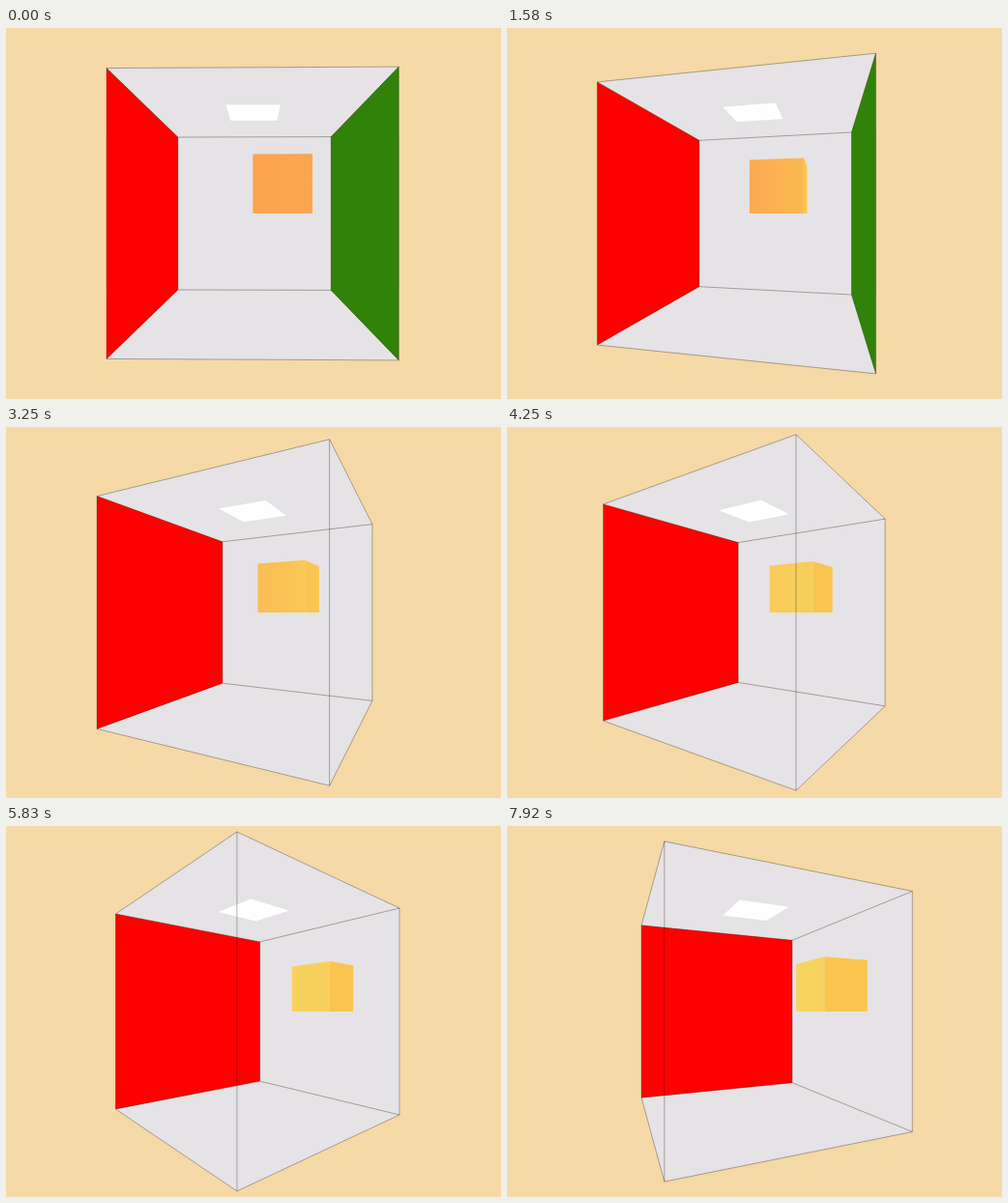
An HTML page with a canvas for the animation above (8 s loop, 512 px wide and 384 px high).

```html
<!DOCTYPE html>
<html lang="en">
<head>
<meta charset="utf-8">
<title>Rotating room</title>
<style>
  html, body { margin: 0; width: 100%; height: 100%; overflow: hidden; background: #f5d9a6; }
  canvas { display: block; width: 100vw; height: 100vh; object-fit: contain; }
</style>
</head>
<body>
<canvas id="stage" width="512" height="384"></canvas>
<script>
const ctx = document.getElementById('stage').getContext('2d');
const LOOP = 8000, FPS = 12;
const DISTANCE = 3.2;                          // camera to room centre, in half room sizes
const FOCAL = 192 / Math.tan(Math.PI / 6);     // 60 degree field of view
const CUBE = 0.5;
const WALL = '#e5e3e6', LINE = 'rgba(0,0,0,.3)';

// seconds, room angle in degrees, green at the left and right of the cube front, its blue
const STEPS = [
  [0,    0.6,  163, 165, 80],
  [0.92, 7,    166, 178, 80],
  [2.25, 18.35, 175, 194, 80],
  [4.25, 35.5, 203, 206, 90],
  [5.83, 48.7, 208, 207, 93],
  [7.08, 59.6, 210, 209, 94],
  [7.92, 67,   211, 210, 95]
];

function stateAt(t) {
  let i = 1;
  while (i < STEPS.length - 1 && t > STEPS[i][0]) i++;
  const a = STEPS[i - 1], b = STEPS[i];
  const p = Math.min(1, (t - a[0]) / (b[0] - a[0]));
  return a.map((v, k) => v + (b[k] - v) * p);
}

// The cube glides to the back, then returns at the same speed.
const cubeFront = t => -0.7155 + 0.1835 * Math.abs(t - 6.624);

let cos = 1, sin = 0;

function project([x, y, z]) {
  const scale = FOCAL / (DISTANCE - (x * sin + z * cos));
  return [256 + (x * cos - z * sin) * scale, 192 - y * scale];
}

function trace(points) {
  ctx.beginPath();
  points.forEach(p => ctx.lineTo(...project(p)));
}

function face(color, ...points) {
  trace(points);
  ctx.closePath();
  ctx.fillStyle = color;
  ctx.fill();
}

function edge(a, b) {
  trace([a, b]);
  ctx.strokeStyle = LINE;
  ctx.lineWidth = 1;
  ctx.stroke();
}

function sideWall(color, x) {
  face(color, [x, 1, 1], [x, 1, -1], [x, -1, -1], [x, -1, 1]);
}

function level(color, y, r) {
  face(color, [-r, y, -r], [r, y, -r], [r, y, r], [-r, y, r]);
}

function drawRoom() {
  face(WALL, [-1, 1, -1], [1, 1, -1], [1, -1, -1], [-1, -1, -1]);
  level(WALL, 1, 1);
  level(WALL, -1, 1);
  sideWall('#fe0000', -1);
  if (DISTANCE * sin < 1) sideWall('#308208', 1);   // seen only from inside
  level('#fffeff', 0.998, 0.25);

  for (const s of [-1, 1]) {
    for (const r of [-1, 1]) {
      edge([-1, s, r], [1, s, r]);
      edge([s, r, -1], [s, r, 1]);
    }
    edge([s, -1, -1], [s, 1, -1]);
  }
  edge([-1, -1, 1], [-1, 1, 1]);
}

function drawCube(front, greenLeft, greenRight, blue) {
  const back = Math.max(-1, front - CUBE);          // the back wall cuts it off
  const bottomLeft = [0, 0, front], topLeft = [0, CUBE, front];
  const bottomRight = [CUBE, 0, front], topRight = [CUBE, CUBE, front];
  if (DISTANCE * sin > CUBE) {
    face('#f9c550', bottomRight, topRight, [CUBE, CUBE, back], [CUBE, 0, back]);
  }
  const shade = ctx.createLinearGradient(project(bottomLeft)[0], 0, project(bottomRight)[0], 0);
  shade.addColorStop(0, `rgb(${253 - (greenLeft - 163) / 9},${greenLeft},${blue})`);
  shade.addColorStop(1, `rgb(${252 - (greenRight - 165) / 9},${greenRight},${blue})`);
  face(shade, bottomLeft, topLeft, topRight, bottomRight);
}

function draw(ms) {
  const t = Math.floor((ms + 5) * FPS / 1000) % (LOOP * FPS / 1000) / FPS;
  const [, degrees, greenLeft, greenRight, blue] = stateAt(t);
  const angle = degrees * Math.PI / 180;
  cos = Math.cos(angle);
  sin = Math.sin(angle);

  ctx.fillStyle = '#f5d9a6';
  ctx.fillRect(0, 0, 512, 384);
  drawRoom();
  drawCube(cubeFront(t), greenLeft, greenRight, blue);
  edge([1, -1, 1], [1, 1, 1]);
}

const start = performance.now();
function tick() {
  draw((performance.now() - start) % LOOP);
  requestAnimationFrame(tick);
}
tick();
</script>
</body>
</html>
```
